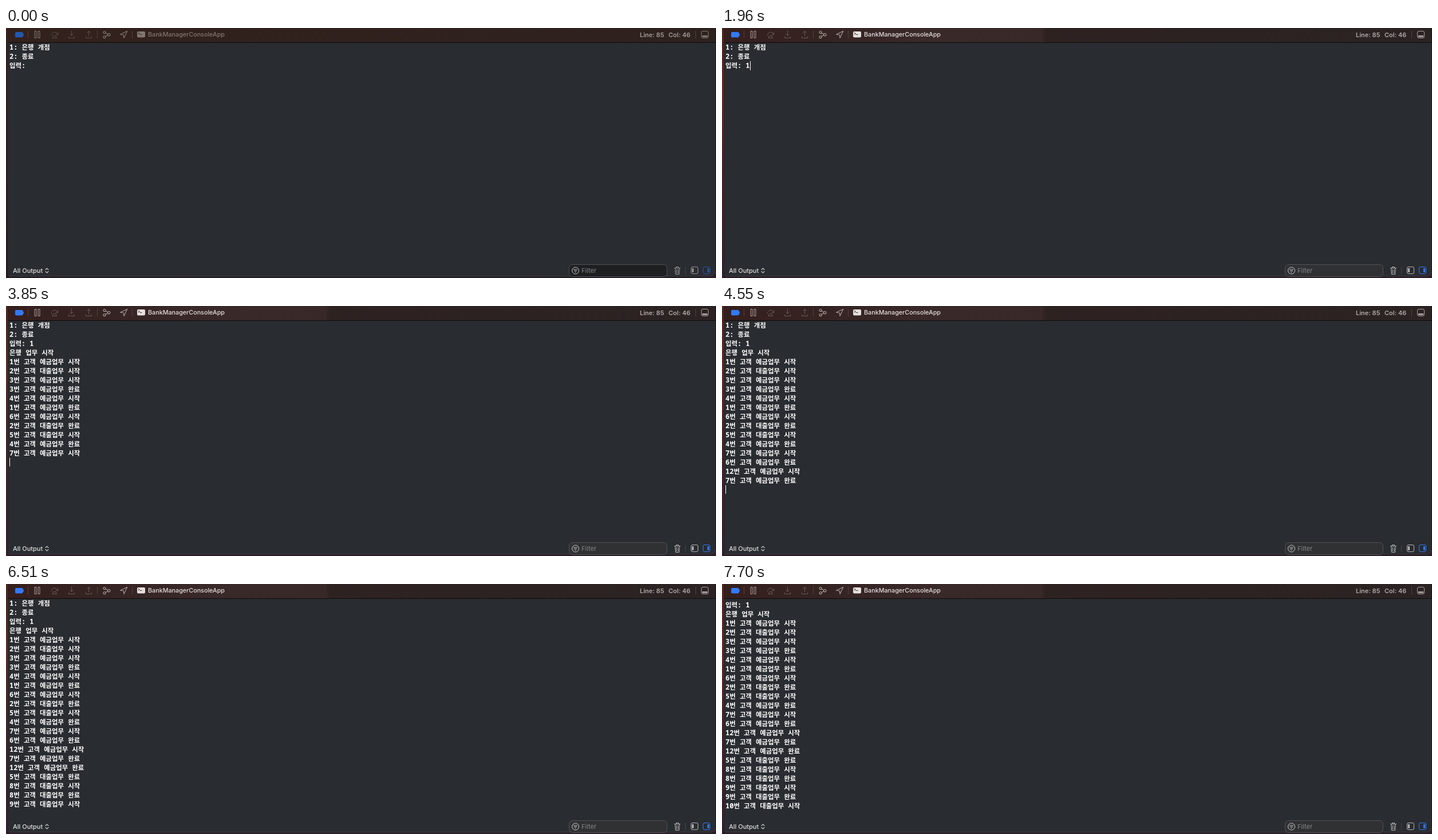
Animation, 1240 px wide and 438 px high, one loop 8 s. Source, as an HTML page with a canvas:

```html
<!DOCTYPE html>
<html lang="ko">
<head>
<meta charset="utf-8">
<title>Console</title>
<style>
html, body { margin: 0; width: 100%; height: 100%; overflow: hidden; background: #292c30; }
canvas { display: block; }
</style>
</head>
<body>
<canvas id="stage" width="1240" height="438"></canvas>
<script>
const ctx = document.getElementById("stage").getContext("2d");
const LOOP = 8000, FOCUS = 420, ROW = 16, TOP = 26, LEFT = 6;
const SCROLL_AT = 7000, SCROLL_BY = 29;
const UI_FONT = 'Inter, Roboto, sans-serif';
const LATIN = '12px "Noto Sans Mono", "DejaVu Sans Mono", monospace';
const HANGUL = '11.4px "Noto Sans CJK KR", "Noto Sans CJK JP", "Noto Sans CJK", sans-serif';

const job = (id, kind, state) => `${id}번 고객 ${kind}업무 ${state}\n`;
const save = (id, state) => job(id, "예금", state);
const loan = (id, state) => job(id, "대출", state);
const START = "시작", DONE = "완료";

// Text appended to the console, by time; every entry restarts the caret blink.
const output = [
  [0, "1: 은행 개점\n2: 종료\n입력: "],
  [FOCUS, ""],
  [1960, "1"],
  [2310, "\n"],
  [2380, "은행 업무 시작\n" + save(1, START) + loan(2, START) + save(3, START)],
  [3080, save(3, DONE) + save(4, START)],
  [3150, save(1, DONE) + save(6, START)],
  [3500, loan(2, DONE) + loan(5, START)],
  [3850, save(4, DONE) + save(7, START)],
  [3920, save(6, DONE) + save(12, START)],
  [4550, save(7, DONE)],
  [4620, save(12, DONE)],
  [4690, loan(5, DONE) + loan(8, START)],
  [5810, loan(8, DONE)],
  [5950, loan(9, START)],
  [SCROLL_AT, loan(9, DONE) + loan(10, START)]
];

function rect(x, y, w, h, color) {
  ctx.fillStyle = color;
  ctx.fillRect(x, y, w, h);
}

function box(x, y, w, h, r, fill, stroke) {
  ctx.beginPath();
  ctx.roundRect(x, y, w, h, r);
  if (fill) { ctx.fillStyle = fill; ctx.fill(); }
  if (stroke) { ctx.strokeStyle = stroke; ctx.lineWidth = 1; ctx.stroke(); }
}

function line(path, color, width = 1) {
  ctx.strokeStyle = color;
  ctx.lineWidth = width;
  ctx.lineCap = ctx.lineJoin = "round";
  ctx.stroke(new Path2D(path));
}

function label(text, x, y, color, weight = 500, size = 11) {
  ctx.font = `${weight} ${size}px ${UI_FONT}`;
  ctx.fillStyle = color;
  ctx.fillText(text, x, y);
}

function gradient(x, y, ...stops) {
  const g = ctx.createLinearGradient(0, 0, x, y);
  stops.forEach(([at, color]) => g.addColorStop(at, color));
  return g;
}

function drawWindow(active) {
  rect(0, 0, 1240, 438, active
    ? gradient(0, 438, [0, "#572318"], [0.25, "#6b2a1f"], [0.6, "#4c2026"], [1, "#3b1e31"])
    : gradient(0, 438, [0, "#3c2019"], [0.6, "#351f1d"], [1, "#2a1a22"]));
  rect(4, 434, 1236, 4, active ? "#2b2029" : "#261f26");
  rect(3, 0, 1, 438, "#120d0d");
  box(4, -20, 1235, 454.5, [0, 0, 9, 0], "#292c30", "#3b3d40");
  rect(4, 26, 1, 408, "#292c30");
  rect(4, 0, 1235, 25, active
    ? gradient(1240, 0, [0, "#351f1d"], [0.15, "#352423"], [0.3, "#392928"], [0.45, "#382827"], [0.456, "#2e2221"], [1, "#2b2323"])
    : gradient(1240, 0, [0, "#33211c"], [1, "#2e221f"]));
  rect(4, 25, 1235, 1, "#0d0b0b");
  rect(1239, 0, 1, 428, "#151314");
}

function drawToolbar(active) {
  const blue = active ? "#3279f6" : "#2258b0";
  const icon = active ? "#aaa09f" : "#857a77";
  const dim = active ? "#665b59" : "#5a4e4a";
  const name = active ? "#e6e0df" : "#82766f";

  ctx.fillStyle = blue;
  ctx.fill(new Path2D("M18 7H27Q28.5 7 29.4 8.2L31.2 11.7L29.4 15.2Q28.5 16.4 27 16.4H18Q16 16.4 16 14.4V9Q16 7 18 7Z"));
  for (const x of [38, 159, 220, 1204]) rect(x, 5, 1, 13, "#51423f");

  line("M50.5 5.5H53V17.5H50.5ZM56.5 5.5H59V17.5H56.5Z", icon);
  line("M79 13Q81 7 85 7.2Q89 7.4 90 11M90.8 8V11.6H87M81.5 17.5H88.5L87 13.8H83Z", dim);
  line("M114.5 5V13.5M111.5 10.5L114.5 13.5L117.5 10.5M109.5 15V17.5H119.5V15", dim);
  line("M144.5 14V5.5M141.5 8.5L144.5 5.5L147.5 8.5M139.5 15V17.5H149.5V15", dim);
  line("M173.5 8.5L178 11M173.5 14.8L178 12.4M170 7.5A2 2 0 1 0 174 7.5A2 2 0 1 0 170 7.5M170 15.8A2 2 0 1 0 174 15.8A2 2 0 1 0 170 15.8M177.5 11.7A2.2 2.2 0 1 0 181.9 11.7A2.2 2.2 0 1 0 177.5 11.7", icon, 1.1);
  line("M199.5 11.2L211.7 5.5L206 17.6L205.2 12Z", icon, 1.1);

  box(229, 6, 14, 10.5, 2, name);
  line("M231.3 8.3L233.4 9.8L231.3 11.3M234.5 11.5H237", "#352523");
  label("BankManagerConsoleApp", 248, 15, name, 500, 10.75);

  const status = active ? "#b0a9a7" : "#a39b98";
  label("Line: 85", 1107, 16, status, 600);
  label("Col: 46", 1157, 16, status, 600);
  box(1214.5, 5.5, 12, 12, 2.5, null, icon);
  rect(1216, 13, 9, 3, icon);
}

function drawFooter(active) {
  const icon = active ? "#b5b6b7" : "#97989a";
  const blue = active ? "#3279f6" : "#2258b0";
  label("All Output", 12, 429, "#dfe0e0");
  line("M69 423.5L71.5 421L74 423.5M69 426.5L71.5 429L74 426.5", "#c8c9ca", 1.1);

  box(983.5, 414.5, 171, 21, 6, active ? "#303133" : "#1e1f20", "#505255");
  line("M988.5 425A6 6 0 1 0 1000.5 425A6 6 0 1 0 988.5 425M991.5 423H997.5M992.5 425.5H996.5M993.8 428H995.2", "#c9cacb");
  label("Filter", 1005, 429, "#858688", 400);

  line("M1167.5 420.5H1177.5M1170.5 420V418.5H1174.5V420M1168.7 421L1169.4 431.5H1175.6L1176.3 421M1171 423V429.5M1174 423V429.5", icon);
  rect(1186, 419, 1, 12, "#44464a");
  box(1196.5, 418.5, 12, 12, 2.5, null, icon);
  rect(1198, 421, 3, 7, icon);
  box(1217.5, 418.5, 12, 12, 2.5, null, blue);
  rect(1225, 421, 3, 7, blue);
}

// Draws one console row and returns the x where it ends.
function drawRow(text, baseline) {
  let x = LEFT;
  ctx.fillStyle = "#fff";
  for (const run of text.match(/[가-힣]+|: |[^가-힣:]+|:/g) || []) {
    const typed = run === "1" && text.startsWith("입력");
    ctx.font = `${typed ? 600 : 900} ${/[가-힣]/.test(run) ? HANGUL : LATIN}`;
    ctx.fillText(run, x, baseline);
    x += ctx.measureText(run).width;
  }
  return x;
}

function drawConsole(t) {
  const shown = output.filter(([at]) => at <= t);
  const rows = shown.map(([, text]) => text).join("").split("\n");
  const top = TOP - (t >= SCROLL_AT ? SCROLL_BY : 0);

  ctx.save();
  ctx.beginPath();
  ctx.rect(4, TOP, 1234, 387);
  ctx.clip();
  let end = LEFT;
  rows.forEach((text, i) => { end = drawRow(text, top + i * ROW + 12); });

  const idle = t - shown[shown.length - 1][0];
  if (t >= FOCUS && (idle < 560 || idle >= 1190)) {
    rect(Math.ceil(end - 0.05), top + (rows.length - 1) * ROW, 1, end > LEFT ? 16 : 15, "#fff");
  }
  ctx.restore();

  if (t >= SCROLL_AT && t < 7700) {
    ctx.globalAlpha = t < 7560 ? 1 : t < 7630 ? 0.67 : 0.33;
    box(1230, 55, 7, 355, 3.5, "#98999b");
    ctx.globalAlpha = 1;
  }
}

function frame(now) {
  const t = now % LOOP;
  const active = t >= FOCUS;
  drawWindow(active);
  drawToolbar(active);
  drawConsole(t);
  drawFooter(active);
  requestAnimationFrame(frame);
}
requestAnimationFrame(frame);
</script>
</body>
</html>
```
